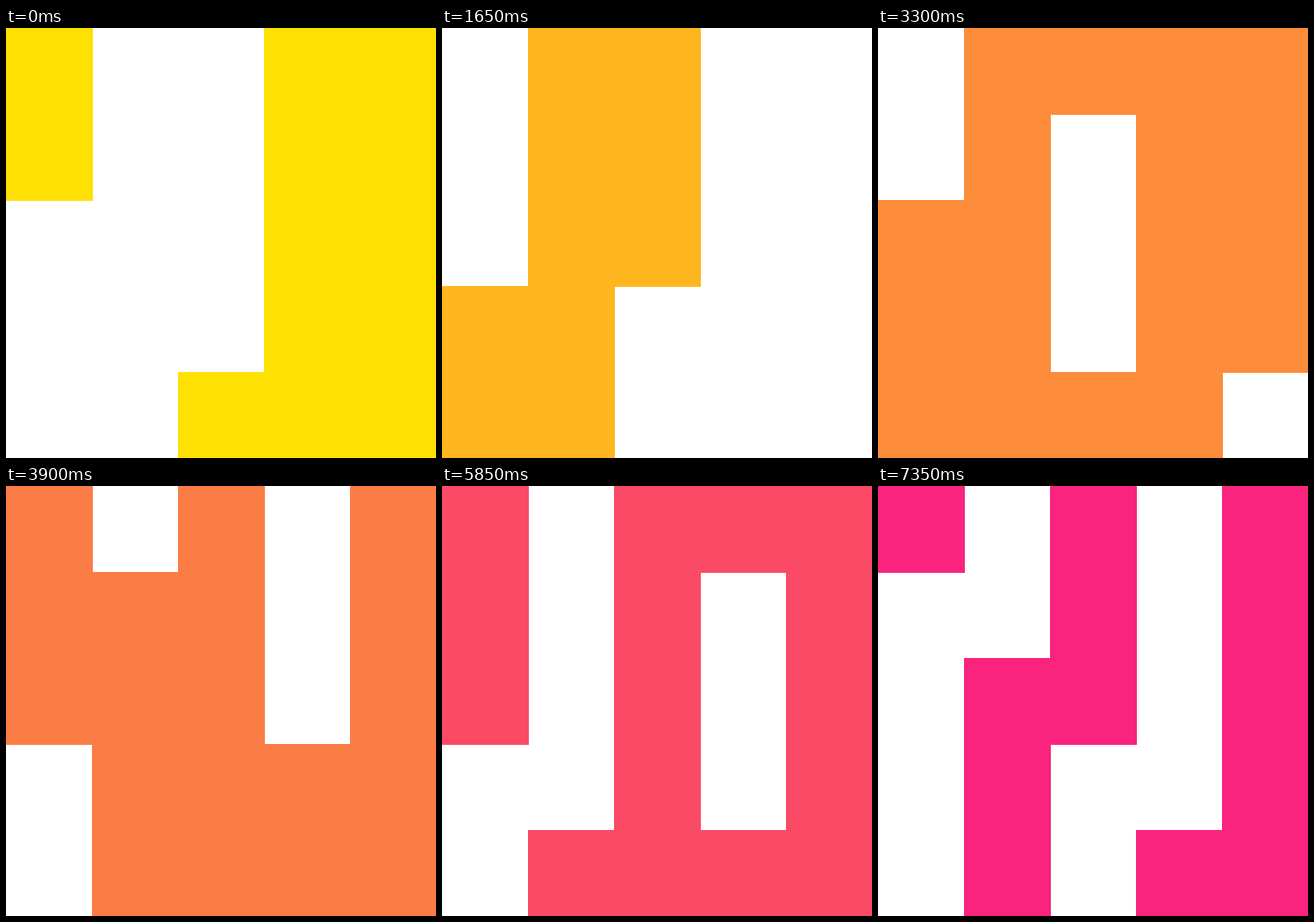
Animation, 500 px wide and 500 px high, one loop 7500 ms. Source, as an HTML page with a canvas:

```html
<!DOCTYPE html>
<html lang="en">
<head>
<meta charset="utf-8">
<title>Column snake</title>
<style>
  html, body { margin: 0; width: 100%; height: 100%; overflow: hidden; background: #fff; }
  canvas { display: block; width: 500px; height: 500px; }
</style>
</head>
<body>
<canvas id="stage" width="500" height="500"></canvas>
<script>
const ctx = document.getElementById('stage').getContext('2d');
const STEP = 150, STEPS = 50, GRID = 5, CELL = 100;
const FROM = [255, 224, 3], TO = [250, 36, 127];

// Filled stretches of the ribbon, which runs down each column in turn
// and moves on by one cell per step.
const RUNS = [[-49, -49], [-42, -37], [-30, -24], [-20, -12], [-8, 1], [14, 24]];
const filled = p => RUNS.some(([a, b]) => p >= a && p <= b);

function color(step) {
  const k = step / (STEPS - 1);
  return `rgb(${FROM.map((v, i) => Math.round(v + (TO[i] - v) * k))})`;
}

function draw(step) {
  ctx.fillStyle = '#fff';
  ctx.fillRect(0, 0, 500, 500);
  ctx.fillStyle = color(step);
  for (let i = 0; i < GRID * GRID; i++) {
    if (!filled(i - step)) continue;
    // Cells overlap their neighbours by one pixel
    ctx.fillRect(Math.floor(i / GRID) * CELL, (i % GRID) * CELL, CELL + 1, CELL + 1);
  }
}

const start = performance.now();
function tick() {
  const t = performance.now() - start;
  draw(Math.floor(t / STEP) % STEPS);
  requestAnimationFrame(tick);
}
tick();
</script>
</body>
</html>
```
